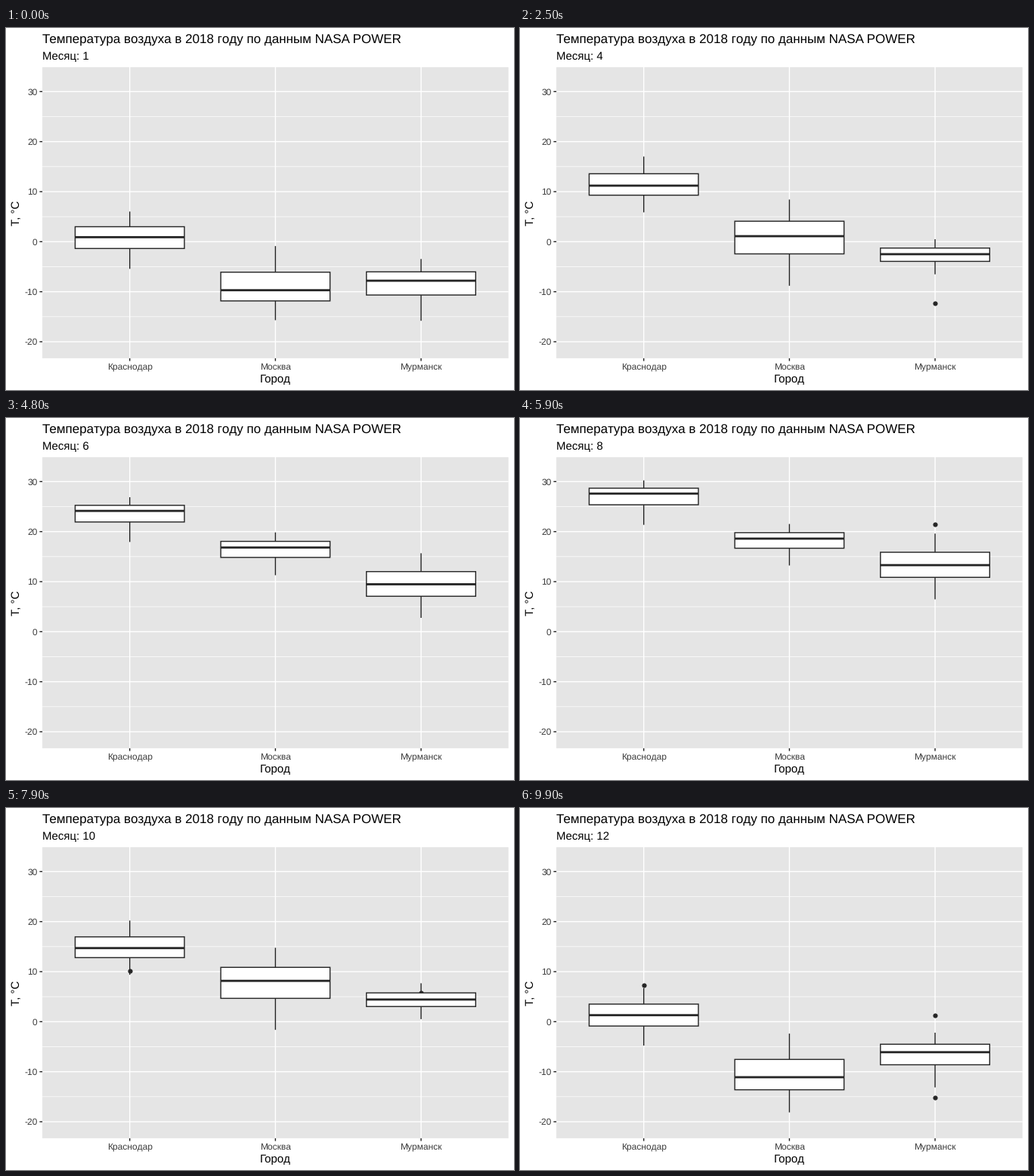
A matplotlib script for the animation above (10 s loop, 672x480 px).

```python
import numpy as np
import matplotlib.pyplot as plt
from matplotlib.animation import FuncAnimation
from matplotlib.patches import Rectangle

plt.rcParams.update({
    "font.family": "Liberation Sans",
    "text.hinting": "none",
    "text.hinting_factor": 1,
    "path.snap": False,
})

W, H, DPI = 672, 480, 96
FRAMES, INTERVAL, STEPS = 100, 100, 9      # nine steps from month to month
LEFT, RIGHT, TOP, BOTTOM = 48.1, 664.67, 52, 437.9
T_MIN, T_MAX = -23.3, 34.87
INK, LABEL, PANEL = "#252525", "#3D3D3D", "#E5E5E5"
THIN, BOX_WIDTH = 1.42, 0.75

# Medians move straight between these steps; hinges follow yearly waves,
# given as (mean, yearly swing, half-yearly swing) below and above the median.
KEY_STEPS = [0, 14, 25, 38, 59, 73, 86, 99]
REACH_LOW, REACH_HIGH = 2.8, 2.45          # whisker length per hinge distance
CITIES = {
    "Краснодар": dict(
        medians=[0.9, 3.5, 11.2, 21.0, 27.6, 20.2, 8.3, 1.3],
        below=(2.08, 0, 0.18), above=(1.93, 0.55, -0.39),
        outliers={9: [13.0], 10: [9.4], 12: [7.3]}),
    "Москва": dict(
        medians=[-9.7, -10.5, 1.1, 15.2, 18.6, 14.3, 1.0, -11.1],
        below=(2.75, 0.18, -0.79), above=(2.6, 1.25, -0.25),
        outliers={}),
    "Мурманск": dict(
        medians=[-7.8, -9.5, -2.5, 6.0, 13.3, 7.8, 0.5, -6.1],
        below=(2.05, 0.16, 0.65), above=(1.74, -0.45, 0.48),
        outliers={4: [-12.25], 8: [21.5], 9: [1.4, 0.6], 10: [7.0, 6.0],
                  11: [2.0, -7.1], 12: [1.3, -15.1]}),
}


def px(width):
    return width * 72 / DPI


def x_at(slot):
    return LEFT + (slot - 0.4) / 3.2 * (RIGHT - LEFT)


def y_at(temp):
    return BOTTOM - (temp - T_MIN) / (T_MAX - T_MIN) * (BOTTOM - TOP)


def wave(step, mean, yearly, half_yearly):
    angle = 2 * np.pi * step / (12 * STEPS)
    return mean + yearly * np.cos(angle) + half_yearly * np.cos(2 * angle)


fig = plt.figure(figsize=(W / DPI, H / DPI), dpi=DPI, facecolor="white")
ax = fig.add_axes([0, 0, 1, 1])
ax.set(xlim=(0, W), ylim=(H, 0))
ax.axis("off")


def line(xs, ys, color, width, z):
    return ax.plot(xs, ys, color=color, lw=px(width), zorder=z,
                   solid_capstyle="butt")[0]


def text(x, y, s, size, color="black", ha="left", **kw):
    return ax.text(x, y, s, fontsize=size, color=color, ha=ha,
                   va="baseline", **kw)


def draw_panel():
    ax.add_patch(Rectangle((LEFT, TOP), RIGHT - LEFT, BOTTOM - TOP,
                           fc=PANEL, lw=0, zorder=0))
    for temp in range(-20, 31, 5):
        y, major = y_at(temp), temp % 10 == 0
        line([LEFT, RIGHT], [y, y], "white", THIN if major else THIN / 2, 1)
        if major:
            line([LEFT - 3.67, LEFT], [y, y], INK, THIN, 1)
            text(LEFT - 6.6, y + 4.2, str(temp), 8.8, LABEL, "right")
    for slot, name in enumerate(CITIES, 1):
        x = x_at(slot)
        line([x, x], [TOP, BOTTOM], "white", THIN, 1)
        line([x, x], [BOTTOM, BOTTOM + 3.67], INK, THIN, 1)
        text(x, 452.9, name, 8.8, LABEL, "center")
    text(LEFT, 20, "Температура воздуха в 2018 году по данным NASA POWER", 12.95)
    text((LEFT + RIGHT) / 2, 469.6, "Город", 11, ha="center")
    text(17.9, (TOP + BOTTOM) / 2, "T, °C", 11, ha="center", rotation=90,
         rotation_mode="anchor")


class Box:
    def __init__(self, slot, medians, below, above, outliers):
        self.medians, self.outliers = medians, outliers
        self.below, self.above = below, above
        self.x = x_at(slot)
        left, right = x_at(slot - BOX_WIDTH / 2), x_at(slot + BOX_WIDTH / 2)
        self.dots, = ax.plot([], [], "o", color=INK, ms=px(5.21),
                             mew=px(0.945), zorder=2)
        self.whisker = line([self.x] * 2, [0, 0], INK, THIN, 3)
        self.body = ax.add_patch(Rectangle((left, 0), right - left, 0,
                                           fc="white", ec=INK, lw=px(THIN),
                                           joinstyle="miter", zorder=4))
        self.median = line([left, right], [0, 0], INK, 2 * THIN, 5)

    def outliers_at(self, step):
        month, rest = divmod(step, STEPS)
        start = self.outliers.get(month + 1, [])
        if rest == 0:
            return np.array(start)
        end = np.array(self.outliers.get(month + 2, []))
        begin = np.resize(start, end.shape) if start else end
        return begin + (end - begin) * rest / STEPS

    def pose(self, step):
        mid = np.interp(step, KEY_STEPS, self.medians)
        below, above = wave(step, *self.below), wave(step, *self.above)
        low, high = y_at(mid - REACH_LOW * below), y_at(mid + REACH_HIGH * above)
        q1, q3 = y_at(mid - below), y_at(mid + above)
        self.whisker.set_ydata([low, high])
        self.body.set(y=q3, height=q1 - q3)
        self.median.set_ydata([y_at(mid)] * 2)
        dots = y_at(self.outliers_at(step))
        self.dots.set_data(np.full(len(dots), self.x), dots)


draw_panel()
boxes = [Box(slot, **city) for slot, city in enumerate(CITIES.values(), 1)]
subtitle = text(LEFT, 41.6, "", 11)


def update(step):
    for box in boxes:
        box.pose(step)
    subtitle.set_text(f"Месяц: {round(1 + step / STEPS)}")


anim = FuncAnimation(fig, update, frames=FRAMES, interval=INTERVAL,
                     init_func=lambda: update(0), repeat=True, repeat_delay=0)
plt.show()
```
